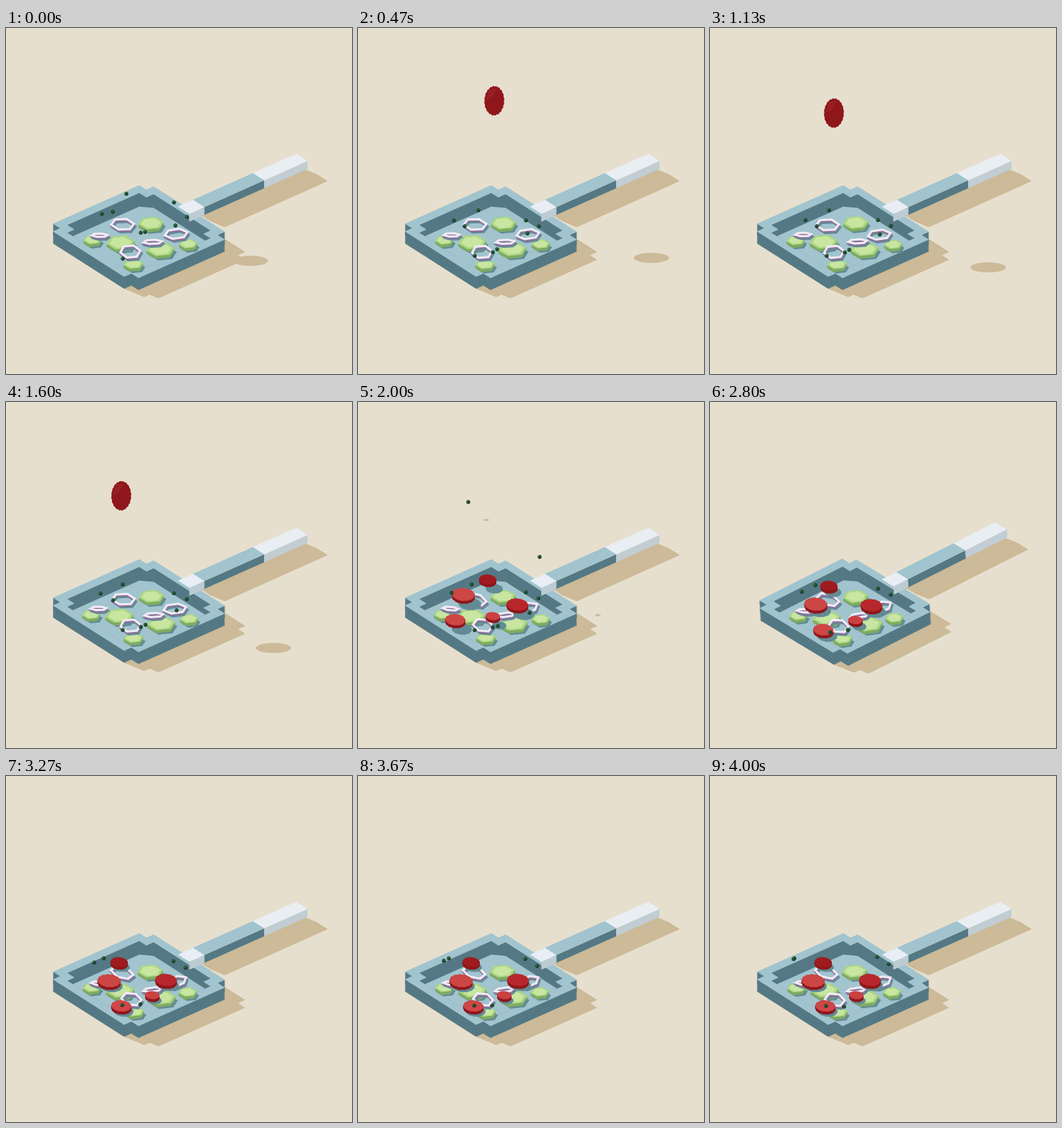
An HTML page with a canvas that plays this animation: 480x480 px, repeating every 4070 ms.

```html
<!DOCTYPE html>
<html lang="en">
<head>
<meta charset="utf-8">
<title>Pan</title>
<style>
html, body { margin: 0; width: 100%; height: 100%; overflow: hidden; background: #e7dfce; }
canvas { display: block; width: 480px; height: 480px; }
</style>
</head>
<body>
<canvas id="stage" width="480" height="480"></canvas>
<script>
const ctx = document.getElementById("stage").getContext("2d");
const LOOP = 4070, STEP = 66.67, SPLIT = 1640, LANDED = 2000;
const BG = "#e7dfce", GROUND = "#ccba98", LIGHT = "#a1c4ce", DARK = "#547984", SHADE = "#628b96";
const RED = "#8f171b", PHASE = -.2;

const CUCUMBERS = [
  { x: 201, y: 270, r: 18 }, { x: 158, y: 297, r: 20 }, { x: 215, y: 307, r: 20 },
  { x: 253, y: 300, r: 13 }, { x: 119, y: 294, r: 13 }, { x: 177, y: 327, r: 14 }
];
// turn: how far the ring leans once the slices have landed
const ONIONS = [
  { x: 162, y: 273, rx: 17, ry: 9, turn: .3 }, { x: 235, y: 286, rx: 17, ry: 8, turn: -.3 },
  { x: 173, y: 310, rx: 15, ry: 10, turn: .2 }, { x: 204, y: 296, rx: 14, ry: 4, turn: -.1 },
  { x: 129, y: 287, rx: 12, ry: 3.5, turn: .1 }
];
// drop: settling distance at the start; dx, dy: later drift; end: time it sinks from view
const HERBS = [
  { x: 167, y: 253, drop: 23, dx: -50, dy: 0 },
  { x: 133, y: 267, drop: 9, dx: -17, dy: -13 },
  { x: 233, y: 267, drop: 25, dx: -1, dy: -16 },
  { x: 251, y: 275, drop: 13, dx: -3, dy: -14 },
  { x: 235, y: 285, drop: 11, dx: 16, dy: 40, end: 2200 },
  { x: 148, y: 275, drop: 20, dx: 6, dy: 0, end: 1800 },
  { x: 193, y: 307, drop: 24, dx: 5, dy: 20, end: 2500 },
  { x: 187, y: 311, drop: 27, dx: -1, dy: 9 },
  { x: 162, y: 316, drop: -4, dx: -1, dy: 3 }
];
// These fall late; k is the starting distance to the shadow
const LOOSE = [
  { x: 153, from: 112, to: 302, k: 29 },
  { x: 252, from: 200, to: 306, k: 94 }
];
const SLICES = [
  { x: 180, y: 247, dx: -23, dy: 12, r: 12, top: "#a01b20" },
  { x: 146, y: 268, dx: -3, dy: 17, r: 16, top: "#cb4644" },
  { x: 221, y: 282, dx: 1, dy: 2, r: 15, top: "#b8272b" },
  { x: 135, y: 303, dx: 25, dy: 17, r: 14, top: "#cf4645" },
  { x: 187, y: 298, dx: 16, dy: 7, r: 10, top: "#cb4140" }
];

const mix = (a, b, p) => a + (b - a) * p;
const span = (t, a, b) => Math.max(0, Math.min(1, (t - a) / (b - a)));
const smooth = p => p * p * (3 - 2 * p);
const easeOut = p => 1 - (1 - p) ** 3;

// Pan grid: a runs down right, b down left
const P = (a, b) => [195 + 9.9 * a - 10 * b, 213.5 + 6.3 * a + 4.46 * b];
const shift = (pts, x, y) => pts.map(p => [p[0] + x, p[1] + y]);
const rect = (a0, a1, b0, b1) => [P(a0, b0), P(a1, b0), P(a1, b1), P(a0, b1)];

// Rectangle on the grid with one cell cut from each corner
function notched(a0, a1, b0, b1) {
  const corner = (a, b, i, j) => [P(a + i, b), P(a + i, b + j), P(a, b + j)];
  return [
    ...corner(a0, b0, 1, 1).reverse(), ...corner(a1, b0, -1, 1),
    ...corner(a1, b1, -1, -1).reverse(), ...corner(a0, b1, 1, -1)
  ];
}
const RIM = notched(0, 12, 0, 14), OPENING = notched(1, 11, 1, 13);
const HANDLE = rect(5, 6.6, -15.8, -1.5);

function trace(pts) {
  ctx.beginPath();
  for (const [x, y] of pts) ctx.lineTo(x, y);
  ctx.closePath();
}

function fill(pts, color) {
  trace(pts);
  ctx.fillStyle = color;
  ctx.fill();
}

// Fill a shape at every step from one offset to another
function sweep(pts, [x0, y0], [x1, y1], color) {
  const n = Math.ceil(Math.max(Math.abs(x1 - x0), Math.abs(y1 - y0)));
  for (let i = 0; i <= n; i++) fill(shift(pts, mix(x0, x1, i / n), mix(y0, y1, i / n)), color);
}

function blob(x, y, rx, ry, n, jag = 0, rot = 0, phase = 0) {
  const c = Math.cos(rot), s = Math.sin(rot);
  return Array.from({ length: n }, (_, i) => {
    const a = i / n * Math.PI * 2 + phase, r = 1 + (i % 2 ? jag : -jag);
    const u = Math.cos(a) * rx * r, v = Math.sin(a) * ry * r;
    return [x + u * c - v * s, y + u * s + v * c];
  });
}

function slab(pts, depth, top, side) {
  sweep(pts, [0, depth], [0, 1], side);
  fill(pts, top);
}

// Bar on the grid: top and right face
function bar(a0, a1, b0, b1, depth, top, side) {
  const near = [P(a1, b0), P(a1, b1)];
  fill([...near, ...shift(near, 0, depth).reverse()], side);
  fill(rect(a0, a1, b0, b1), top);
}

function setSway(t) {
  const p = span(t, 2100, 3200);
  const a = 2.5 * (1 - p * p) * Math.sin((t - 2100) / 860 * Math.PI * 2) * (p > 0 ? 1 : 0);
  ctx.setTransform(1 + .008 * a, .02 * a, -.048 * a, 1 - .015 * a, 10.24 * a, .1 * a);
}

function drawPan() {
  sweep(RIM, [0, 16.5], [28, 28], GROUND);
  sweep(HANDLE, [9, 20], [28, 28], GROUND);
  bar(5, 6.6, -9.8, -1, 11, LIGHT, DARK);
  bar(5, 6.6, -15.8, -9.8, 11, "#e9eef3", "#c1cdd3");
  slab(RIM, 16.5, LIGHT, DARK);
  ctx.save();
  trace(OPENING);
  ctx.clip();
  fill(OPENING, DARK);
  fill(shift([P(1, 2), P(2, 1), P(10, 1), P(10, 2), P(14, 2), P(14, 16), P(2, 16), P(1, 12)], 0, 19), LIGHT);
  ctx.restore();
  bar(5, 6.6, -1.5, .6, 11, "#e8eef3", "#bdcbd2");
}

// Gentle settling of everything that lies in the pan
const wobble = (t, i) => [Math.sin(t / 700 + i * 2), .7 * Math.cos(t / 600 + i)];

function drawCucumber({ x, y, r }, i, t) {
  const [dx, dy] = wobble(t, i);
  const shape = k => blob(x + dx, y + dy, r * k, r * k * .52, 6, 0, 0, PHASE);
  fill(shift(shape(1), 3, 6), SHADE);
  slab(shape(1), 4, "#acd684", "#7fab62");
  fill(shape(.78), "#c8e6a0");
}

function drawOnion({ x, y, rx, ry, turn }, i, t) {
  const [dx, dy] = wobble(t, i + 3);
  const lean = turn * mix(.2, 1, span(t, SPLIT, LANDED));
  const shape = blob(x + dx, y + dy, rx - 1, ry - 1, 6, 0, lean, PHASE);
  const band = (ox, oy, color) => {
    trace(shift(shape, ox, oy));
    ctx.strokeStyle = color;
    ctx.stroke();
  };
  ctx.lineWidth = 3;
  band(2, 4, SHADE);
  band(0, 2, "#8c6f9b");
  band(0, 0, "#f1ebf5");
}

function drawHerb(x, y) {
  fill(blob(x, y, 3, 3, 6, 0, .4), "#183f29");
  fill(blob(x - .7, y - .8, 1.7, 1.7, 4), "#2e6b3c");
}

function herbPlace(h, t) {
  const drop = h.drop * (1 - easeOut(span(t, 0, 450))), p = span(t, 470, 4000) ** 2;
  return [h.x + h.dx * p, h.y + h.dy * p - drop];
}

// Flies in fast, then hangs in slow motion
function tomatoPlace(t) {
  const p = easeOut(span(t, 0, 400)), q = (Math.max(t, 400) - 470) / 660;
  return {
    x: mix(-8, 189 - 17 * q, p), y: mix(-24, 101 + 17 * q, p), k: mix(347, 218 - 4 * q, p)
  };
}

function drawTomato({ x, y }) {
  fill(blob(x, y, 13.7, 20.3, 40, .025, .03), RED);
  ctx.strokeStyle = "#a83a3a";
  ctx.lineWidth = .8;
  for (let i = 0; i < 4; i++) {
    ctx.beginPath();
    ctx.moveTo(x - 11 + i, y - 2 - i * 4);
    ctx.lineTo(x - 3 + i * 2, y - 6 - i * 3);
    ctx.stroke();
  }
}

function slicePlace(s, i, t) {
  const start = tomatoPlace(SPLIT), p = span(t, SPLIT, LANDED - 10 * i);
  const settle = smooth(span(t, LANDED, 3270));
  return {
    x: mix(start.x, s.x, p) + s.dx * settle,
    y: mix(start.y + (i - 2) * 6, s.y, p * p) + s.dy * settle,
    k: start.k * (1 - p * p), p, gap: mix(9, 3, settle)
  };
}

function drawSlice(s, i, t) {
  const { x, y, p, gap } = slicePlace(s, i, t);
  const shape = blob(x, y - 1, s.r, s.r * .56, 26, .025, .08);
  if (p === 1) fill(shift(shape, gap, gap + 4), SHADE);
  slab(shape, 4, s.top, RED);
}

function groundShadow({ x, y, k }, rx, ry) {
  fill(blob(x + k, y + k, rx, ry, 36, .025), GROUND);
}

function loosePlace(h, t) {
  const p = span(t, 1760, 2400) ** 2;
  return { x: h.x, y: mix(h.from, h.to, p), k: h.k * (1 - p) };
}

function draw(t) {
  ctx.setTransform(1, 0, 0, 1, 0, 0);
  ctx.fillStyle = BG;
  ctx.fillRect(0, 0, 480, 480);
  const whole = t < SPLIT, tomato = tomatoPlace(t);
  const loose = t > 1760 && t < 2400 ? LOOSE.map(h => loosePlace(h, t)) : [];

  if (whole) groundShadow(tomato, 24.5, 7);
  else SLICES.forEach((s, i) => groundShadow(slicePlace(s, i, t), s.r, s.r * .4));
  loose.forEach(h => groundShadow(h, 4, 1.5));

  setSway(t);
  drawPan();
  CUCUMBERS.forEach((c, i) => drawCucumber(c, i, t));
  ONIONS.forEach((o, i) => drawOnion(o, i, t));
  if (!whole) SLICES.forEach((s, i) => drawSlice(s, i, t));
  HERBS.filter(h => t < (h.end || LOOP)).forEach(h => drawHerb(...herbPlace(h, t)));
  loose.forEach(h => drawHerb(h.x, h.y));
  if (whole) drawTomato(tomato);
}

const start = performance.now();
function tick() {
  const t = (performance.now() - start) % LOOP;
  draw(Math.min(60, Math.floor((t + 5) / 66.7)) * STEP);
  requestAnimationFrame(tick);
}
tick();
</script>
</body>
</html>
```
